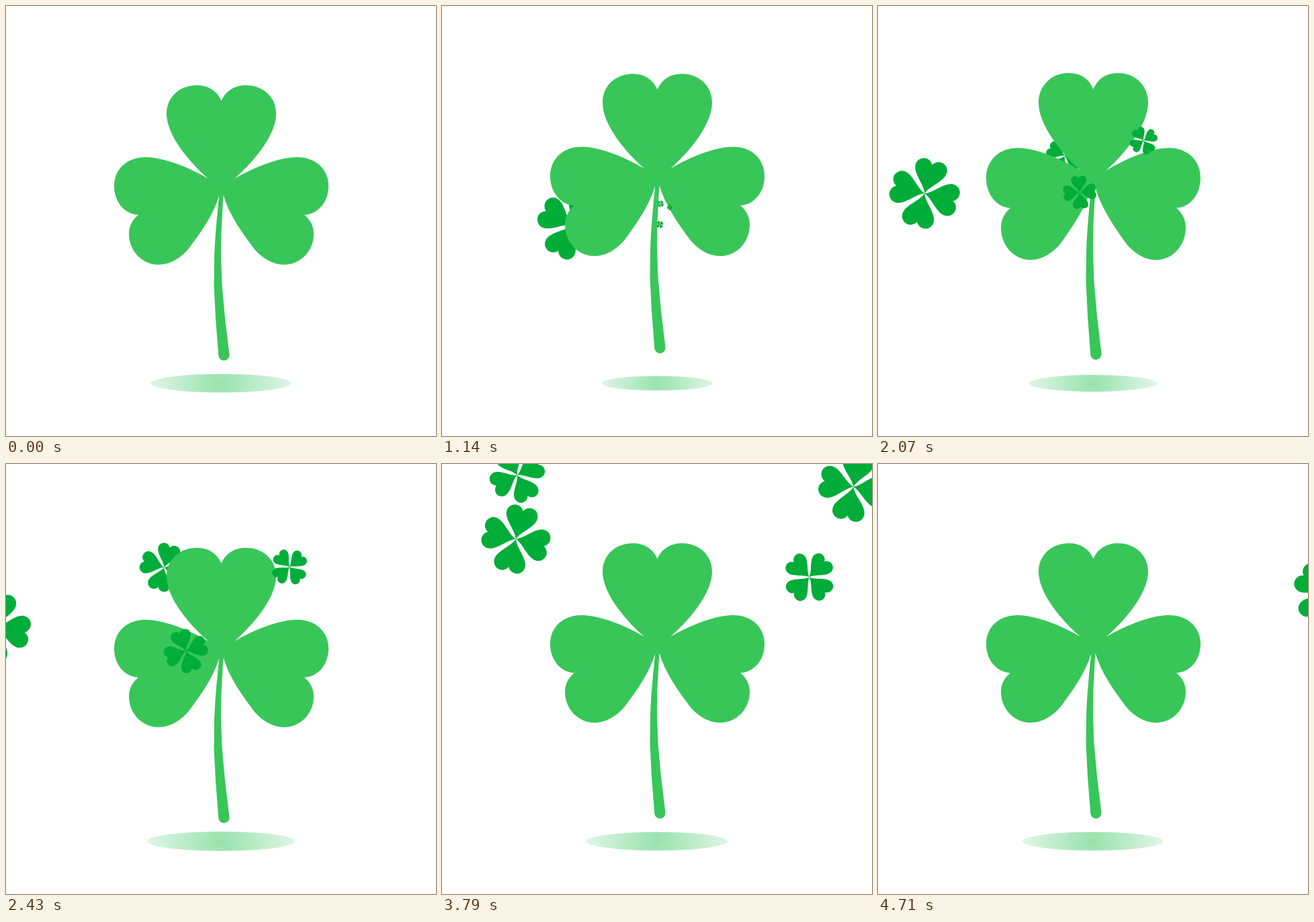
These frames come from a looping animation (640 by 640 pixels, 4780 ms). An HTML page:

```html
<!DOCTYPE html>
<html lang="en">
<head>
<meta charset="utf-8">
<title>Bouncing shamrock</title>
<style>
  html, body { margin: 0; width: 100%; height: 100%; overflow: hidden; background: #fff; }
  svg { display: block; width: 100%; height: 100%; }
</style>
</head>
<body>
<svg viewBox="0 0 640 640">
  <defs>
    <radialGradient id="glow" gradientUnits="userSpaceOnUse" cx="0" cy="0" r="105">
      <stop offset="0" stop-color="#98e2ac"/>
      <stop offset="1" stop-color="#e0f6e6"/>
    </radialGradient>
    <path id="petal" d="M0 0C.24 .08 .46 .455 .72 .455A.24 .24 0 0 0 .827 0A.24 .24 0 0 0 .72 -.455C.46 -.455 .24 -.08 0 0Z"/>
    <g id="clover">
      <use href="#petal"/>
      <use href="#petal" transform="rotate(90)"/>
      <use href="#petal" transform="rotate(180)"/>
      <use href="#petal" transform="rotate(270)"/>
    </g>
    <path id="half" d="M321 141H320.5C314 126 301 118 284 118C258 118 239 136 239 160C239 190 268 228 301 257
      C272 240 234 225 208 225C180 225 161 243 161 268C161 292 177 310 197 311C188 318 183 328 183 339
      C183 364 202 385 227 385C246 385 262 373 272 361C290 337 309 310 317 283L321 279Z"/>
  </defs>
  <ellipse id="shadow" rx="105" ry="13.7" fill="url(#glow)"/>
  <g id="back" fill="#00ad39"></g>
  <g id="shamrock" fill="#38c659">
    <use href="#half"/>
    <use href="#half" transform="matrix(-1 0 0 1 641 0)"/>
    <path d="M317.5 280C315 305 310 350 310 385L309.5 415L312 465L316.3 520.5A8.1 8.1 0 0 0 332.5 518.5L326 465L321.5 415L320 372L320.5 335L323.5 280Z"/>
  </g>
  <g id="front" fill="#00ad39"></g>
</svg>
<script>
const LOOP = 4780, STEP = LOOP / 67, BEAT = 720, LEAD = 190;
const byId = id => document.getElementById(id);
const place = (el, transform) => el.setAttribute('transform', transform);

const poses = [
  { at: 0, stretch: 1, shift: 0, shade: 1 },
  { at: 620, stretch: .8, shift: 46, shade: 1.15 },
  { at: 1560, stretch: 1.133, shift: -46.5, shade: .59 },
  { at: 2430, stretch: 1, shift: 6.7, shade: 1.05 },
  { at: 2980, stretch: 1, shift: 0, shade: 1 }
];

// Each clover passes one point of its path per beat; grow and turn are also per beat
const clovers = [
  { layer: 'back', first: 0, size: 53, grow: 1.3, angle: 41, turn: -10,
    path: [[360, 300], [215, 323], [158, 318], [3, 250], [-170, 190]] },
  { layer: 'back', first: 1, size: 42, grow: 2.4, angle: 88, turn: -23,
    path: [[322, 330], [320, 297], [244, 168], [158, 37], [111, 16], [0, -50], [-110, -130]] },
  { layer: 'back', first: 1, size: 52, grow: 5.3, angle: 79, turn: -7,
    path: [[390, 300], [395, 300], [400, 290], [449, 242], [548, 168], [640, 180], [735, 222]] },
  { layer: 'front', first: 1, size: 53, grow: 4, angle: 111, turn: -20,
    path: [[330, 315], [368, 251], [416, 164], [484, 58], [614, 34], [760, 70]] },
  { layer: 'front', first: 1, size: 52, grow: 3.3, angle: 74, turn: -30,
    path: [[324, 305], [323, 269], [276, 280], [179, 240], [109, 110], [25, -35], [-50, -150]] }
];

for (const c of clovers) {
  c.el = document.createElementNS('http://www.w3.org/2000/svg', 'use');
  c.el.setAttribute('href', '#clover');
  byId(c.layer).append(c.el);
}

// Catmull-Rom curve through evenly timed points
function along(path, age) {
  const i = Math.floor(age), u = age - i;
  const [p, a, b, q] = [-1, 0, 1, 2].map(k => path[Math.max(0, Math.min(path.length - 1, i + k))]);
  return [0, 1].map(k => a[k] + u / 2 * (b[k] - p[k]
    + u * (2 * p[k] - 5 * a[k] + 4 * b[k] - q[k] + u * (3 * (a[k] - b[k]) + q[k] - p[k]))));
}

function drawShamrock(t) {
  const next = poses.findIndex(p => p.at > t);
  const b = poses[next < 0 ? poses.length - 1 : next], a = next < 0 ? b : poses[next - 1];
  const u = a === b ? 1 : (t - a.at) / (b.at - a.at);
  const e = (1 - Math.cos(Math.PI * u ** .88)) / 2;
  const mix = key => a[key] + (b[key] - a[key]) * e;
  place(byId('shamrock'), `translate(0 ${320 + mix('shift')}) scale(1 ${mix('stretch')}) translate(0 -320)`);
  place(byId('shadow'), `translate(320 561.5) scale(${mix('shade')})`);
}

function drawClover(c, beat) {
  const age = beat - c.first;
  const on = age > 0 && age < c.path.length - 1;
  c.el.style.display = on ? '' : 'none';
  if (!on) return;
  const [x, y] = along(c.path, age);
  const r = c.size * Math.min(1, age / c.grow);
  place(c.el, `translate(${x} ${y}) rotate(${c.angle + c.turn * beat}) scale(${r})`);
}

const start = performance.now();
function tick() {
  const now = Math.max(0, performance.now() - start) % LOOP;
  const t = Math.min(66, Math.floor((now + 4) / STEP)) * STEP;
  drawShamrock(t);
  clovers.forEach(c => drawClover(c, (t - LEAD) / BEAT));
  requestAnimationFrame(tick);
}
tick();
</script>
</body>
</html>
```
